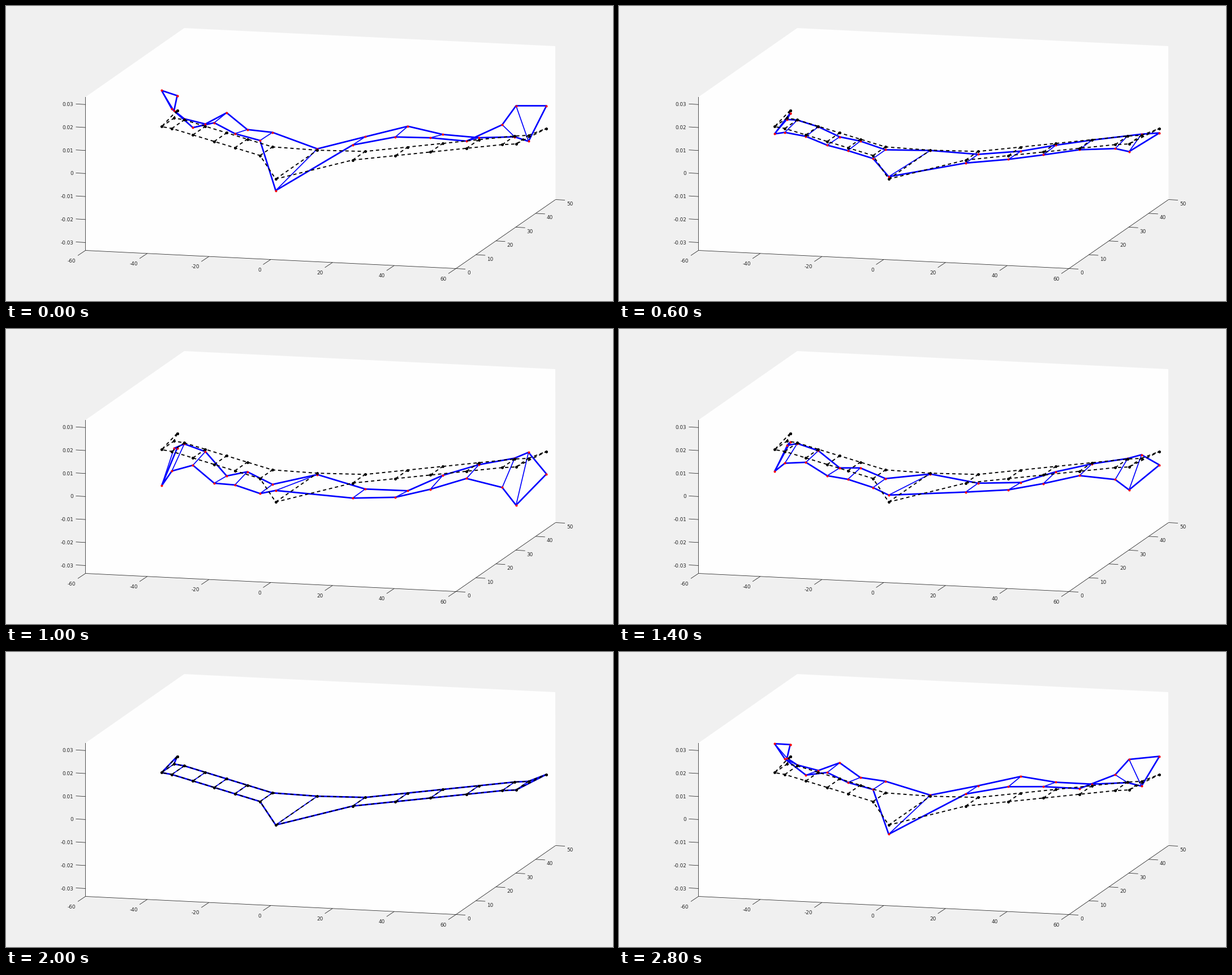
Recreate the animation shown at these times as a matplotlib script. Size 1073 px wide and 522 px high, loop 3000 ms.

```python
import numpy as np
import matplotlib.pyplot as plt
from matplotlib.animation import FuncAnimation

W, H, DPI = 1073, 522, 100
PX = 72 / DPI  # points per pixel
FRAMES, INTERVAL = 15, 200
INK = "#262626"

# Screen position of the data origin and screen steps per unit of x and y
ORIGIN = np.array([468.3, 312.0])
X_STEP = np.array([5.458, 0.267])
Y_STEP = np.array([3.52, -2.44])

HALF_SPAN = np.array([15, 26, 35, 44.3, 53.5, 57.4])
CHORD = 6.25
TIP_X, TIP_Y = 59.8, 45.65


def project(x, y):
    """Screen positions of points in the resting plane."""
    return ORIGIN + np.outer(x, X_STEP) + np.outer(y, Y_STEP)


def mode(x):
    """Upward swing in pixels of the front and back edge at span x."""
    a, side = np.abs(x), np.sign(x)
    dip = np.exp(-a / 5)               # body moves against the wings
    flare = np.exp((a - 57.4) / 6)     # strong motion towards the tips
    skew = side * (30.5 - a) * np.exp(-((a - 30.5) / 6) ** 2)
    lean = side * flare ** 3
    bend = 14 * (1 - np.tanh((a - 41) / 4)) - 37 * dip + 33.5 * flare
    twist = 1 - 12.4 * dip + 31.3 * flare
    bend = bend + 2.7 * skew - 5 * lean
    twist = twist - 1.15 * skew + 6.8 * lean
    return bend + twist, bend - twist


# Swept wing, mirrored about a body at span 0
span = np.concatenate([-HALF_SPAN[::-1], [0], HALF_SPAN])
lead = np.minimum(11.8 + 0.4 * np.abs(span), 34.1)
body = span == 0
front = project(span, np.where(body, 2.4, lead))
back = project(span, np.where(body, 23.3, lead + CHORD))
tips = project([-TIP_X, TIP_X], [TIP_Y, TIP_Y])

front_lift, back_lift = mode(span)
tip_lift = np.array([26, 40])

outline = np.vstack([tips[:1], front, tips[1:], back[::-1], tips[:1]])
outline_lift = np.concatenate([tip_lift[:1], front_lift, tip_lift[1:],
                               back_lift[::-1], tip_lift[:1]])

# Ribs form one broken line: front, back, gap, front, ...
gap = np.full_like(front, np.nan)
ribs = np.stack([front, back, gap], axis=1).reshape(-1, 2)
ribs_lift = np.stack([front_lift, back_lift, 0 * span], axis=1).ravel()

fig = plt.figure(figsize=(W / DPI, H / DPI), dpi=DPI, facecolor="#f0f0f0")
ax = fig.add_axes([0, 0, 1, 1])
ax.set_xlim(0, W)
ax.set_ylim(H, 0)
ax.axis("off")


def stroke(points, color, width, **kw):
    xs, ys = np.transpose(points)
    return ax.plot(xs, ys, color=color, lw=width * PX, solid_capstyle="butt",
                   solid_joinstyle="round", **kw)[0]


def dots(points, color, size, z):
    xs, ys = np.transpose(points)
    return ax.plot(xs, ys, "o", color=color, ms=size * PX, mew=0, zorder=z)[0]


def axis_ticks(start, end, values, tick, offset, align):
    """Tick marks and labels spaced evenly from start to end."""
    for f, value in zip(np.linspace(0, 1, len(values)), values):
        foot = np.array(start) + f * np.subtract(end, start)
        head = foot + tick
        stroke([foot, head], INK, 0.8)
        ax.text(*(head + offset), f"{value:g}", ha=align, va="center_baseline",
                color=INK, family="DejaVu Sans", size=8.9 * PX)


# Box walls and axes
top, right, corner, base = (140.5, 161), (971.5, 342.5), (795.5, 464.5), (140.5, 432.5)
ax.fill(*np.transpose([(315, 39), (971, 71), right, corner, base, top]),
        color="#fefefe", lw=0)
stroke([top, base, corner, right], INK, 0.8)
axis_ticks((140.5, 418.5), (140.5, 174.3), np.arange(-3, 4) / 100,
           (-17, -1), (-4, 0.5), "right")
axis_ticks(base, corner, range(-60, 61, 20), (-13.5, 9), (-3.5, 8.5), "right")
axis_ticks(corner, right, range(0, 51, 10), (16.5, 1), (3, 6), "left")

# Moving shape
edge = stroke(outline, "#0000ff", 2.7, zorder=3)
struts = stroke(ribs, "#0000ff", 1.7, zorder=3)
nodes = dots(outline, "#ff0000", 4, 4)

# Resting shape
for part in (outline, ribs):
    stroke(part, "black", 1.9, dashes=(3.1, 2.6), zorder=5)
dots(outline, "black", 5, 6)


def swing(i):
    """Fast linear fall from 1 to -1, then a slower linear rise."""
    return np.interp(i, [0, 5, 15], [1, -1, 1])


def draw(i):
    s = swing(i)
    edge.set_ydata(outline[:, 1] - s * outline_lift)
    nodes.set_ydata(outline[:, 1] - s * outline_lift)
    struts.set_ydata(ribs[:, 1] - s * ribs_lift)
    return edge, struts, nodes


anim = FuncAnimation(fig, draw, frames=FRAMES, interval=INTERVAL,
                     repeat=True, repeat_delay=0)
plt.show()
```
